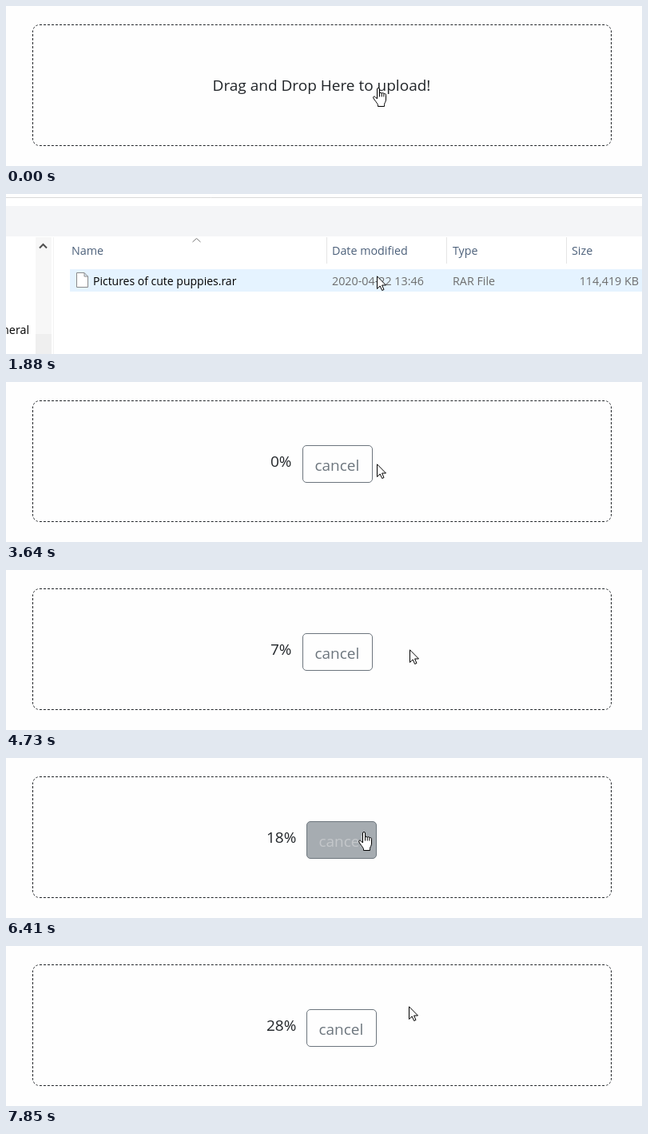
Recreate the animation shown at these times as an HTML page. Size 796 by 200 pixels, loop 7.99 s.

```html
<!DOCTYPE html>
<html lang="en">
<head>
<meta charset="utf-8">
<title>Drag and drop upload</title>
<style>
  html, body { margin: 0; width: 100%; height: 100%; overflow: hidden; background: #fefefe; }
  svg, #page { position: absolute; left: 0; top: 0; width: 796px; height: 200px; overflow: hidden; }
  #zone { position: absolute; left: 33px; top: 23px; width: 725px; height: 152px;
    box-sizing: border-box; border: 1px dashed #212529; border-radius: 9px; }
  text { font-family: "Open Sans", "Noto Sans", sans-serif; }
  #page text { font-size: 19px; fill: #212529; }
  #explorer text { font-size: 14.3px; }
  .head { fill: #4c607a; }
  .meta { fill: #6d6d6d; }
</style>
</head>
<body>
<div id="page">
  <div id="zone"></div>
  <svg>
    <text id="prompt" x="395" y="106" text-anchor="middle">Drag and Drop Here to upload!</text>
    <g id="progress">
      <text id="percent" y="106"></text>
      <g id="button">
        <rect id="face" x=".5" y="79.5" width="87" height="46" rx="4.5" stroke="#6c757d"/>
        <text id="label" x="15.500" y="111">cancel</text>
      </g>
    </g>
  </svg>
</div>

<svg id="explorer">
  <rect width="796" height="220" y="-10" fill="#fff"/>
  <path d="M0 4.500H796" stroke="#d9d9d9"/>
  <rect y="15" width="796" height="38" fill="#f4f5f7"/>
  <rect x="37" y="54" width="20" height="146" fill="#f7f7f7"/>
  <rect x="37" y="175" width="20" height="25" fill="#efefef"/>
  <path d="M59.500 54V200" stroke="#f3f3f3"/>
  <path d="M42 67.500L46.500 63L51 67.500" fill="none" stroke="#505050" stroke-width="2"/>
  <path d="M401.500 54V87M551.500 54V87M701.500 54V87" stroke="#e5e5e5"/>
  <path d="M233.500 60L238.500 55.500L243.500 60" fill="none" stroke="#777"/>
  <text x="29" y="175" text-anchor="end">General</text>
  <g class="head">
    <text x="82" y="76">Name</text>
    <text x="408" y="76">Date modified</text>
    <text x="559" y="76">Type</text>
    <text x="708" y="76">Size</text>
  </g>
  <rect id="row" x="80.500" y="94.500" width="720" height="27"/>
  <path d="M88.500 98.500H98L102.500 103V116.500H88.500ZM98 98.500V103H102.500" fill="#fff" stroke="#8a8a8a"/>
  <text x="109" y="114" style="font-size:14px">Pictures of cute puppies.rar</text>
  <g class="meta">
    <text x="408" y="114">2020-04-22 13:46</text>
    <text x="559" y="114">RAR File</text>
    <text x="792" y="114" text-anchor="end">114,419 KB</text>
  </g>
</svg>

<svg>
  <g id="cursor" stroke="#000" fill="#fff">
    <path id="arrow" d="M.5 .8V16.500L4.200 13L6.700 18.500L9 17.500L6.600 12H11.500Z"/>
    <circle id="busy" cx="15" cy="-1" r="5.500" fill="none" stroke="#2f9fd6" stroke-width="3"/>
    <g id="hand" transform="translate(-5)" stroke-linejoin="round">
      <path d="M5.500 14V2a1.500 1.500 0 0 1 3 0V7a1.400 1.300 0 0 1 2.700 .6a1.400 1.300 0 0 1 2.700 .7a1.400 1.300 0 0 1 2.600 .9V15c0 3-2 4-2 6.500v2H6.500v-2C5.500 19 2 15.500 .8 13c-.8-2 1.500-2.500 2.700-1z"/>
      <path d="M8.500 7V11.500M11.200 7.600V11.500M13.900 8.300V11.500"/>
    </g>
  </g>
</svg>

<script>
const LOOP = 7990;
const $ = id => document.getElementById(id);

// Each track lists [start time, value...]; a value holds until the next start.
const cursorTrack = [
  [0, 'hand', 464, 102], [930, 'busy', 464, 102], [1330, 'arrow', 464, 102],
  [4600, 'arrow', 478, 101], [4730, 'arrow', 505, 99], [4850, 'arrow', 525, 97],
  [4970, 'arrow', 532, 96], [5650, 'arrow', 531, 95], [5770, 'arrow', 528, 94],
  [5890, 'arrow', 520, 94], [6010, 'arrow', 507, 94], [6130, 'arrow', 494, 94],
  [6280, 'hand', 456, 93], [6410, 'hand', 446, 92], [6820, 'hand', 448, 88],
  [6950, 'hand', 449, 86], [7090, 'hand', 455, 85], [7250, 'arrow', 478, 82],
  [7400, 'arrow', 502, 77], [7540, 'arrow', 504, 75]
];
const pageTrack = [[0, 1], [1210, .75], [1330, .45], [1450, .2], [3370, 1]];
const explorerTrack = [  // opacity, vertical offset
  [0, 0, 0], [1600, .45, 8], [1760, .9, 2], [1880, 1, 0], [3370, .4, 4], [3490, 0, 0]
];
const hoverTrack = [[0, 0], [6280, .1], [6410, .6], [6550, 1], [7400, 0]];
// The percentage is the number of ticks passed.
const ticks = [
  3910, 4040, 4190, 4340, 4480, 4600, 4730, 4850, 4970, 5110, 5240, 5380, 5510, 5650,
  5770, 6010, 6280, 6410, 6550, 6670, 6820, 6820, 6950, 7090, 7250, 7540, 7700, 7850
];

const hold = (track, t) => track.findLast(key => key[0] <= t).slice(1);
const show = (id, on) => $(id).style.display = on ? '' : 'none';
const mix = (from, to, k) => `rgb(${from.map((c, i) => Math.round(c + (to[i] - c) * k))})`;
const WHITE = [254, 254, 254], GREY = [108, 117, 125];

function draw(t) {
  $('page').style.opacity = hold(pageTrack, t)[0];
  show('prompt', t < 3640);
  show('progress', t >= 3640);

  const percent = ticks.filter(tick => tick <= t).length;
  const wide = percent > 9;
  $('percent').textContent = percent + '%';
  $('percent').setAttribute('x', wide ? 326 : 331);
  $('button').setAttribute('transform', `translate(${wide ? 376 : 371})`);
  const [hover] = hold(hoverTrack, t);
  $('face').style.fill = mix(WHITE, GREY, hover);
  $('label').style.fill = mix(GREY, WHITE, hover);

  const [opacity, offset] = hold(explorerTrack, t);
  $('explorer').style.opacity = opacity;
  $('explorer').style.transform = `translateY(${offset}px)`;
  const selected = t >= 3220;
  $('row').style.fill = selected ? '#cce8ff' : '#e5f3ff';
  $('row').style.stroke = selected ? '#99d1ff' : '#e5f3ff';

  const [kind, x, y] = hold(cursorTrack, t);
  $('cursor').setAttribute('transform', `translate(${x} ${y})`);
  show('hand', kind === 'hand');
  show('arrow', kind !== 'hand');
  show('busy', kind === 'busy');
}

let start;
function tick(now) {
  start ??= now;
  draw((now - start) % LOOP);
  requestAnimationFrame(tick);
}
draw(0);
requestAnimationFrame(tick);
</script>
</body>
</html>
```
